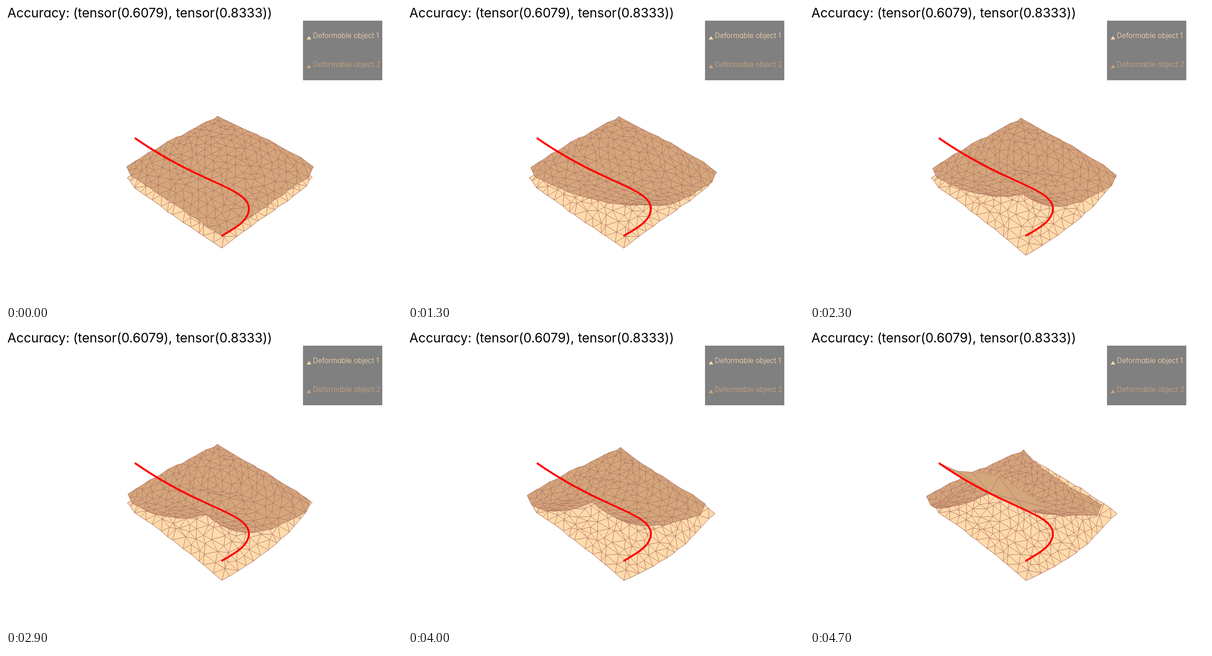
Animation of 864 by 648 pixels, one loop 4800 ms. Source, as an HTML page with a canvas:

```html
<!DOCTYPE html>
<html lang="en">
<head>
<meta charset="utf-8">
<title>Deformable sheets</title>
<style>
  html, body { margin: 0; width: 100%; height: 100%; overflow: hidden; background: #fff; }
  canvas, svg { position: absolute; left: 0; top: 0; width: 864px; height: 648px; }
  text { font-family: Inter, Lato, sans-serif; font-feature-settings: "cv11"; }
  .title { font-size: 28.25px; }
  .item { font-size: 15.5px; font-weight: 300; }
</style>
</head>
<body>
<canvas id="stage" width="864" height="648"></canvas>
<svg viewBox="0 0 864 648">
  <path id="route" fill="none" stroke="#f00" stroke-width="4"
    d="M281 288C330 322 378 349 434 374C480 396 530 413 530 442C530 468 500 485 470 502"/>
  <text class="title" x="3" y="25">Accuracy: (tensor(0.6079), tensor(0.8333))</text>
  <rect x="648" y="32" width="173" height="130" fill="#808080"/>
  <g fill="#ffdbac">
    <path d="M656 73L661 65.500L666 73Z"/>
    <text class="item" x="669.500" y="70">Deformable object 1</text>
  </g>
  <g fill="#d4a67c">
    <path d="M656 135.500L661 128L666 135.500Z"/>
    <text class="item" x="669.500" y="132.500">Deformable object 2</text>
  </g>
</svg>
<script>
const ctx = document.getElementById("stage").getContext("2d");
const route = document.getElementById("route");
const LOOP = 4800, STEP = 100, N = 14;
const LIGHT = "#ffdbac", TAN = "#d4a67c", EDGE = "#b27463";

const mix = (a, b, k) => a + (b - a) * k;
const lerp = (p, q, k) => [mix(p[0], q[0], k), mix(p[1], q[1], k)];
const add = (p, x, y) => [p[0] + x, p[1] + y];
const quad = (a, b, c, k) => lerp(lerp(a, b, k), lerp(b, c, k), k);
// A curve from a to b whose control point is offset from their middle.
const bend = (a, b, x, y) => k => quad(a, add(lerp(a, b, .5), x, y), b, k);
const smooth = (a, b, x) => {
  const k = Math.min(1, Math.max(0, (x - a) / (b - a)));
  return k * k * (3 - 2 * k);
};

const routeLength = route.getTotalLength();
function onRoute(k) {
  const p = route.getPointAtLength(routeLength * (1 - k));
  return [p.x, p.y];
}

function random(seed) {
  return () => {
    seed = (seed * 1664525 + 1013904223) % 4294967296;
    return seed / 4294967296;
  };
}

// A jittered grid, each cell split along its diagonal that looks shorter.
function makeMesh(seed) {
  const rnd = random(seed), nodes = [], edges = [], ring = [];
  const id = (i, j) => i * (N + 1) + j;
  const jitter = (n, size) => n > 0 && n < N ? (rnd() - .5) * size : 0;
  for (let i = 0; i <= N; i++) for (let j = 0; j <= N; j++) {
    const a = i + jitter(i, .6), b = j + jitter(j, .6);
    nodes.push({
      a, b, u: Math.pow(a / N, 1.12), v: 1 - Math.pow(1 - b / N, 1.12),
      rim: i % N === 0 || j % N === 0, dx: (rnd() - .5) * 2, dy: (rnd() - .5) * 4
    });
  }
  const gap = (p, q) => {
    const da = nodes[p].a - nodes[q].a, db = nodes[p].b - nodes[q].b;
    return Math.hypot(da + db, (da - db) * .75);
  };
  for (let i = 0; i <= N; i++) for (let j = 0; j <= N; j++) {
    if (i < N) edges.push([id(i, j), id(i + 1, j)]);
    if (j < N) edges.push([id(i, j), id(i, j + 1)]);
    if (i < N && j < N) {
      const d = [id(i, j), id(i + 1, j + 1)], e = [id(i + 1, j), id(i, j + 1)];
      edges.push(gap(...d) < gap(...e) ? d : e);
    }
  }
  for (let i = 0; i < N; i++) ring.push(id(i, 0));
  for (let j = 0; j < N; j++) ring.push(id(N, j));
  for (let i = N; i > 0; i--) ring.push(id(i, N));
  for (let j = N; j > 0; j--) ring.push(id(0, j));
  return { nodes, edges, ring };
}

// Pulls a point toward a crease line.
function squash(p, { at, angle, power, length, width }, weight) {
  const c = Math.cos(angle), s = Math.sin(angle);
  const x = p[0] - at[0], y = p[1] - at[1];
  const m = (x * c + y * s) / length, n = y * c - x * s;
  const k = n * power * weight * Math.exp(-m * m - (n / width) ** 2);
  return add(p, s * k, -c * k);
}

// Spans a patch between four rim curves; the side corners have a short vertical wall.
function place(mesh, { left, front, right, back, lowLeft, lowRight, curves, folds }) {
  const [leftCurve, rightCurve, backCurve] = curves;
  const farCurve = bend(left, back, 0, -5);
  return mesh.nodes.map(({ u, v, rim, dx, dy }) => {
    const p0 = u < .1 ? lerp(left, lowLeft, u / .1) : leftCurve((u - .1) / .9);
    const p1 = v > .9 ? lerp(lowRight, right, (v - .9) / .1) : rightCurve(v / .9);
    const p2 = backCurve(u), p3 = farCurve(v);
    const near = lerp(left, front, u), far = lerp(back, right, u);
    let p = [0, 1].map(c =>
      mix(p0[c], p2[c], v) + mix(p3[c], p1[c], u) - mix(near[c], far[c], v));
    if (rim) return add(p, dx, dy);
    const weight = Math.min(1, 24 * u * v * (1 - u) * (1 - v));
    for (const fold of folds) p = squash(p, fold, weight);
    return p;
  });
}

// The lower sheet: its front corner drops, then its right corner is dragged down.
function lowerSheet(t) {
  const drop = smooth(1300, 2400, t), drag = smooth(2700, 4000, t);
  const left = lerp([265, 373], [271, 379], drag), lowLeft = [274, 391];
  const right = lerp([667, 371], [669, 397], drag);
  const lowRight = lerp([657, 394], [640, 430], drag);
  const front = lerp([470, 527], [470, 543], drop);
  const back = lerp([465, 267], [468, 273], drag);
  return {
    left, lowLeft, right, lowRight, front, back,
    curves: [
      bend(lowLeft, front, -3, 4 - 14 * drop),
      bend(front, lowRight, 12 * drop, 22 * drop),
      bend(back, right, 5, -8)
    ],
    folds: [{ at: [385, 440], angle: .72, power: .6 * drop, length: 50, width: 18 }]
  };
}

// The upper sheet: its front corner follows the route, slows down and buckles.
function upperSheet(t) {
  const k = t / 4700, late = k ** 4;
  const left = quad([263, 349], [276, 352], [254, 359], k);
  const right = quad([671, 349], [683, 372], [637, 378], k);
  const back = quad([462, 241], [457, 240], [467, 260], k);
  const grip = onRoute(.66 * (1 - Math.pow(1 - k, 1.75)));
  const front = add(grip, 0, 26 * Math.sin(Math.PI * Math.pow(k, 1.4)));
  const lowLeft = add(left, 9, 20), lowRight = add(right, -8, 22);
  const lobe = 86 * Math.sin(2.67 * Math.pow(k, 1.5));
  const power = .7 * smooth(.28, .5, k);
  return {
    left, lowLeft, right, lowRight, front, back,
    curves: [
      bend(lowLeft, front, -50 * late, 36 * Math.min(1, 5 * k)),
      bend(front, lowRight, -lobe / 4, lobe),
      bend(back, right, -30 * late, 14 * late - 9)
    ],
    folds: [
      { at: add(front, 60 * k - 20, -50), angle: .15, power, length: 75, width: 24 },
      { at: add(front, 100 - 180 * k, -5), angle: 2 - 2.6 * k, power, length: 40, width: 22 }
    ]
  };
}

function trace(points) {
  const path = new Path2D();
  points.forEach(p => path.lineTo(...p));
  return path;
}

function drawSheet(mesh, sheet, color) {
  const points = place(mesh, sheet);
  const shape = trace(mesh.ring.map(i => points[i]));
  shape.closePath();
  ctx.fillStyle = color;
  ctx.fill(shape);
  ctx.stroke(shape);
  ctx.save();
  ctx.clip(shape);
  for (const [a, b] of mesh.edges) ctx.stroke(trace([points[a], points[b]]));
  ctx.restore();
}

// The stretched flap that is pulled out toward the far end of the route.
function drawFlap(t) {
  const k = t / 4700, grow = smooth(.85, 1, k);
  if (!grow) return;
  const tip = onRoute(k);
  const [a, b, c, d, e, f] = [[322, 306], [354, 308], [412, 318], [520, 386], [470, 393], [392, 354]]
    .map(p => lerp([362, 338], p, grow));
  ctx.fillStyle = TAN;
  ctx.fill(trace([tip, a, b, c, d, e, f]));
  ctx.stroke(trace([tip, a, b, f, c, e]));
  ctx.stroke(trace([a, f, d]));
}

const lower = makeMesh(41), upper = makeMesh(977);

function draw(t) {
  ctx.clearRect(0, 0, 864, 648);
  ctx.lineJoin = "round";
  ctx.strokeStyle = EDGE;
  drawSheet(lower, lowerSheet(t), LIGHT);
  drawSheet(upper, upperSheet(t), TAN);
  drawFlap(t);
}

const start = performance.now();
function tick(now) {
  const t = Math.max(0, now - start) % LOOP;
  draw(Math.floor(t / STEP) * STEP);
  requestAnimationFrame(tick);
}
draw(0);
requestAnimationFrame(tick);
</script>
</body>
</html>
```
